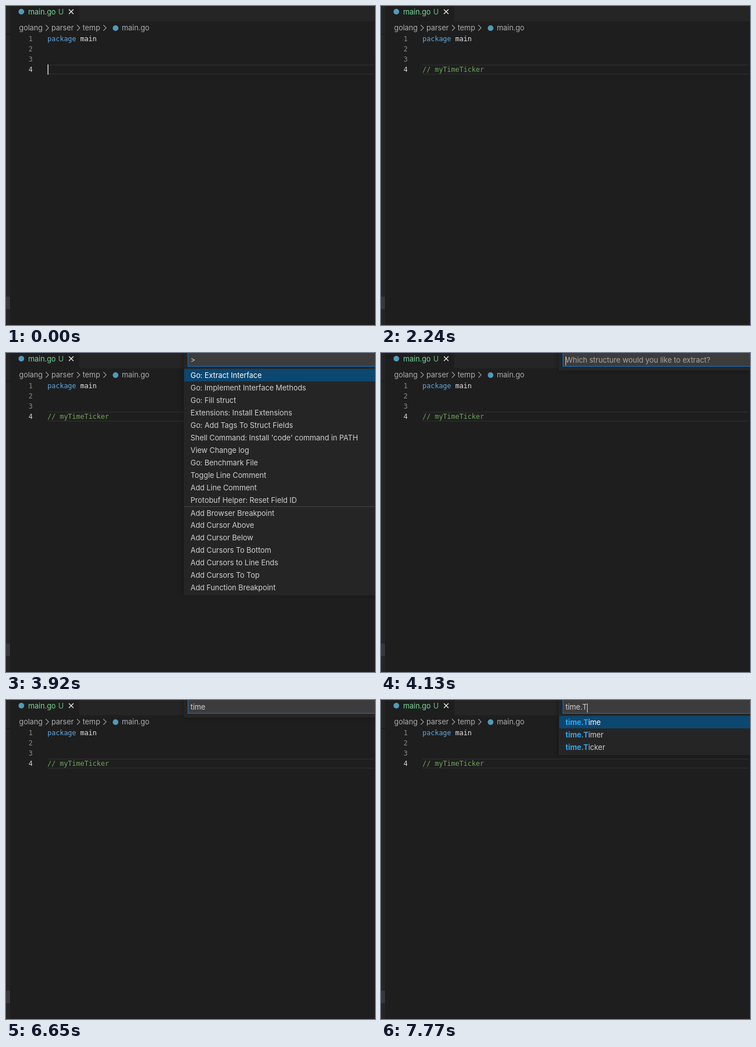
An HTML page for the animation above (8000 ms loop, 650 px wide and 562 px high).

```html
<!DOCTYPE html>
<html lang="en">
<head>
<meta charset="utf-8">
<title>Extract interface</title>
<style>
  html, body { margin: 0; width: 100%; height: 100%; overflow: hidden; background: #1e1e1e; }
  #stage { position: relative; width: 650px; height: 562px; overflow: hidden; background: #1e1e1e;
    font: 13px/22px Inter, "Open Sans", sans-serif; letter-spacing: -0.06px; color: #d0d0d0; }
  #stage div, #stage svg { position: absolute; white-space: pre; }
  .side { left: 0; top: 0; width: 7px; height: 562px; background: #252526; }
  .side .edge { top: 49px; width: 7px; height: 2px; background: #1c1c1c; }
  .side .sel { top: 512px; width: 7px; height: 22px; background: #37373d; }
  .tabs { left: 129px; top: 0; width: 521px; height: 27px; background: #252526; }
  .tab { top: -1px; color: #79d598; }
  .crumb { top: 27px; color: #adadad; }
  .dot { width: 10px; height: 10px; border-radius: 50%; background: #519aba; }
  .code { font: 12px/18px "DejaVu Sans Mono", monospace; letter-spacing: 0; }
  .num { left: 20px; width: 27px; text-align: right; color: #8a8a8a; }
  .now { color: #d6d6d6; }
  .current { left: 73px; top: 103px; width: 575px; height: 14px; border: solid #282828; border-width: 2px 0; }
  #caret { top: 103px; width: 2px; height: 18px; background: #aeafad; }
  #comment { left: 73px; top: 103px; color: #70a45c; }
  #panel { left: 313px; top: -10px; width: 360px; background: #252526; box-shadow: 0 0 8px rgba(0,0,0,.36); }
  #field { left: 7px; top: 6px; width: 360px; height: 26px; border: 1px solid #0e7ad0; background: #3c3c3c; }
  #entry, #hint { left: 4px; top: 3px; line-height: 24px; }
  #hint { color: #a6a6a6; }
  #bar { top: 6px; width: 1px; height: 16px; left: 100%; background: #d8d8d8; }
  #list { left: 1px; top: 38px; width: 360px; }
  .row { left: 0; width: 360px; height: 22px; padding-left: 11px; line-height: 23px; box-sizing: border-box; }
  .row.first { background: #0c4770; color: #fff; }
  .row.split { border-top: 1px solid #444445; }
  .row b { color: #2fa5f2; font-weight: 700; }
</style>
</head>
<body>
<div id="stage">
  <div class="side"><div class="edge"></div><div class="sel"></div></div>
  <div class="tabs"></div>
  <div class="dot" style="left:22px;top:5px"></div>
  <div class="tab" style="left:39px">main.go</div>
  <div class="tab" style="left:92px;opacity:.85">U</div>
  <div class="crumb" style="left:23px">golang</div>
  <div class="crumb" style="left:80px">parser</div>
  <div class="crumb" style="left:135px">temp</div>
  <div class="dot" style="left:188px;top:34px"></div>
  <div class="crumb" style="left:204px">main.go</div>
  <svg width="200" height="50" style="left:0;top:0" fill="none">
    <path d="M110.800 6l8 8m0-8l-8 8" stroke="#f0f0f0" stroke-width="1.3"/>
    <path d="M70 33.500l5 5-5 5M125 33.500l5 5-5 5M171.500 33.500l5 5-5 5" stroke="#a0a0a0" stroke-width="1.1"/>
  </svg>
  <div class="current"></div>
  <div class="code num" style="top:49px">1</div>
  <div class="code num" style="top:67px">2</div>
  <div class="code num" style="top:85px">3</div>
  <div class="code num now" style="top:103px">4</div>
  <div class="code" style="left:73px;top:49px;color:#e8e8e8"><span style="color:#5fa8e2">package</span> main</div>
  <div class="code" id="comment">// myTimeTicker</div>
  <div id="caret"></div>
  <div id="panel">
    <div id="field">
      <div id="hint">Which structure would you like to extract?</div>
      <div id="entry"><span id="typed"></span><div id="bar"></div></div>
    </div>
    <div id="list"></div>
  </div>
</div>
<script>
const LOOP = 8000, STEP = 70, BLINK = 500, ROW = 22;
const FIRST_OFF = 420, PASTE = 685, OPEN = 2415;
const commands = [
  "Go: Extract Interface", "Go: Implement Interface Methods", "Go: Fill struct",
  "Extensions: Install Extensions", "Go: Add Tags To Struct Fields",
  "Shell Command: Install 'code' command in PATH", "View Change log", "Go: Benchmark File",
  "Toggle Line Comment", "Add Line Comment", "Protobuf Helper: Reset Field ID",
  "Add Browser Breakpoint", "Add Cursor Above", "Add Cursor Below", "Add Cursors To Bottom",
  "Add Cursors to Line Ends", "Add Cursors To Top", "Add Function Breakpoint"
];
const structs = ["Time", "Timer", "Ticker", "Location", "ParseError"].map(s => "time." + s);

// Each input state: start time, text, listed rows, matched letters, start of blinking.
const states = [
  { at: 0 },
  { at: OPEN, text: ">", rows: commands },
  { at: 4060, text: "", blinkFrom: 4125 },
  { at: 5320, text: "t" },
  { at: 5530, text: "ti" },
  { at: 5880, text: "tim" },
  { at: 6090, text: "time" },
  { at: 7050, text: "time." },
  { at: 7490, text: "time.", rows: structs, match: 5, blinkFrom: 7050 },
  { at: 7770, text: "time.T", rows: structs.slice(0, 3), match: 6 }
];

const $ = id => document.getElementById(id);
const show = (id, on) => { $(id).style.visibility = on ? "inherit" : "hidden"; };
const lit = (t, from) => Math.floor((t - from) / BLINK) % 2 === 0;

function rowHtml(label, i, { rows, match = 0 }) {
  const kind = i === 0 ? " first" : rows === commands && i === 11 ? " split" : "";
  const head = match ? `<b>${label.slice(0, match)}</b>` : "";
  return `<div class="row${kind}" style="top:${i * ROW}px">${head}${label.slice(match)}</div>`;
}

let shown;
function setPanel(state) {
  if (state === shown) return;
  shown = state;
  const { text, rows = [] } = state;
  show("panel", text !== undefined);
  show("hint", text === "");
  $("typed").textContent = text || "";
  $("list").innerHTML = rows.map((label, i) => rowHtml(label, i, state)).join("");
  $("panel").style.height = 41 + rows.length * ROW + "px";
}

function render(time) {
  const t = Math.floor(time / STEP) * STEP;
  const pasted = t >= PASTE;
  show("comment", pasted);
  $("caret").style.left = (pasted ? 181 : 73) + "px";
  show("caret", t < OPEN && (pasted ? lit(t, PASTE) : t < FIRST_OFF));
  const state = states.filter(s => s.at <= t).pop();
  setPanel(state);
  show("bar", state.text !== undefined && lit(t, state.blinkFrom || state.at));
}

const start = performance.now();
function tick() {
  render((performance.now() - start) % LOOP);
  requestAnimationFrame(tick);
}
tick();
</script>
</body>
</html>
```
